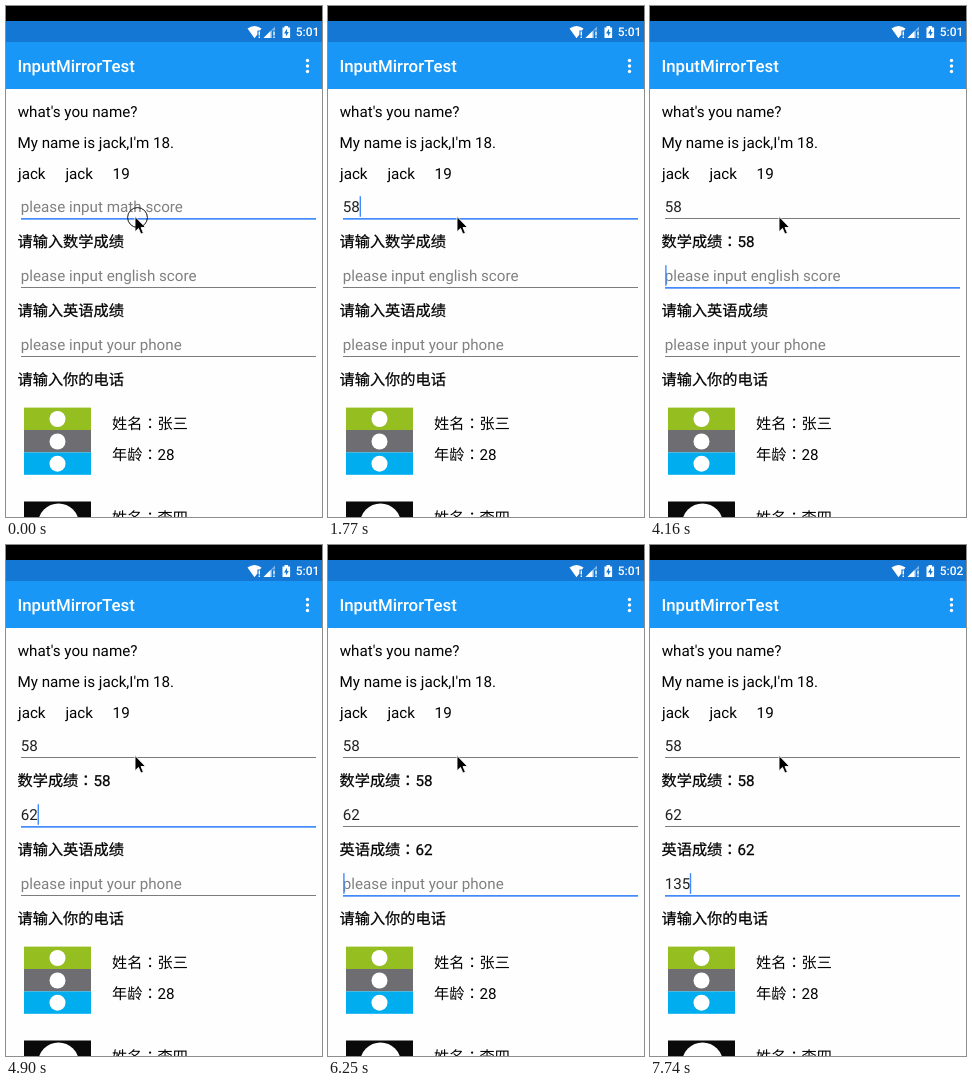
Recreate the animation shown at these times as an HTML page. Size 316 px wide and 511 px high, loop 8000 ms.

```html
<!DOCTYPE html>
<html lang="en">
<head>
<meta charset="utf-8">
<title>Form</title>
<style>
  html, body { margin: 0; width: 100%; height: 100%; overflow: hidden; background: #fefefe; }
  svg { display: block; width: 100vw; height: 100vh; }
  text {
    font: 15.2px Roboto, "Noto Sans CJK SC", "Noto Sans CJK", sans-serif;
    fill: #000; white-space: pre; text-rendering: geometricPrecision;
  }
  .colon { font-family: "Noto Sans CJK JP", "Noto Sans CJK", sans-serif; }
  .label { stroke: #000; stroke-width: .25px; }
  .title { font-size: 16.85px; font-weight: 500; fill: #fff; }
  .clock { font-size: 12px; font-weight: 500; fill: #fff; }
</style>
</head>
<body>
<svg id="stage" viewBox="0 0 316 511" xmlns="http://www.w3.org/2000/svg">
  <rect width="316" height="511" fill="#fefefe"/>
  <rect width="316" height="15" fill="#000"/>
  <rect y="15" width="316" height="21" fill="#1477d4"/>
  <rect y="36" width="316" height="47" fill="#1897f6"/>

  <g fill="#fff">
    <path d="M241.5 22.6Q248.5 17.4 255.5 22.6L254 24.6H251.4V28.6L248.5 32.2Z"/>
    <path d="M252.6 25.4h1.4v4h-1.4zM252.6 30.4h1.4v1.5h-1.4z"/>
    <path d="M257.5 32L269 20.5V24.5H266V32Z" opacity=".45"/>
    <path d="M257.5 32L264.5 25V32Z"/>
    <path d="M267.3 25.4h1.4v4h-1.4zM267.3 30.4h1.4v1.5h-1.4z"/>
    <path d="M276.5 21.5h2V20h3.6v1.5h2V32h-7.6z"/>
    <path d="M281 22.8L278 27.4h1.9v3.2L282.8 26h-1.8z" fill="#1477d4"/>
    <circle cx="301.5" cy="54.5" r="1.7"/>
    <circle cx="301.5" cy="60" r="1.7"/>
    <circle cx="301.5" cy="65.5" r="1.7"/>
  </g>
  <text class="clock" id="clock" x="289.8" y="30.4"></text>
  <text class="title" x="11.4" y="66">InputMirrorTest</text>

  <text x="11.7" y="111.3">what's you name?</text>
  <text x="11.5" y="142">My name is jack,I'm 18.</text>
  <text x="12" y="172.6">jack</text>
  <text x="59.4" y="172.6">jack</text>
  <text x="106.6" y="172.6">19</text>

  <g id="form"></g>

  <rect x="18" y="401.6" width="67" height="22.4" fill="#95bf20"/>
  <rect x="18" y="424" width="67" height="22.4" fill="#6e6e72"/>
  <rect x="18" y="446.4" width="67" height="22.4" fill="#00aeef"/>
  <g fill="#fff">
    <circle cx="51.5" cy="413" r="8"/>
    <circle cx="51.5" cy="435.5" r="8"/>
    <circle cx="51.5" cy="457.7" r="8"/>
  </g>
  <text x="106" y="423.2">姓名<tspan class="colon" lang="ja">：</tspan>张三</text>
  <text x="106" y="454">年龄<tspan class="colon" lang="ja">：</tspan>28</text>

  <rect x="18" y="495.5" width="67" height="15.5" fill="#0a0a0a"/>
  <circle cx="52.5" cy="518" r="20.5" fill="#fff"/>
  <text x="106" y="517.2">姓名<tspan class="colon" lang="ja">：</tspan>李四</text>

  <path d="M129 210.5v15.2l3.5-3.3 2.4 5.7 2.5-1.1-2.4-5.5h4.6z" fill="#000" stroke="#fff" stroke-width=".9"/>
  <circle id="tap" cx="131.5" cy="211.5" r="9.9" fill="none" stroke="#111"/>
</svg>
<script>
const LOOP = 8000;
const NS = "http://www.w3.org/2000/svg";
const BLUE = "#448aff";
const get = id => document.getElementById(id);

function add(tag, attrs) {
  const el = document.createElementNS(NS, tag);
  for (const key in attrs) el.setAttribute(key, attrs[key]);
  return get("form").appendChild(el);
}

// savedAt: when the label below starts to echo the value
const fields = [
  { hint: "please input math score", prompt: "请输入数学成绩", name: "数学成绩", savedAt: 2070, line: 212 },
  { hint: "please input english score", prompt: "请输入英语成绩", name: "英语成绩", savedAt: 5500, line: 281 },
  { hint: "please input your phone", prompt: "请输入你的电话", savedAt: Infinity, line: 350 }
];
for (const f of fields) {
  f.text = add("text", { x: 14.8, y: f.line - 5.8 });
  f.rule = add("rect", { x: 15, y: f.line, width: 295 });
  f.label = add("text", { x: 11.5, y: f.line + 29, class: "label" });
}
const caret = add("rect", { width: 1.4, height: 20.6, fill: BLUE });

// [start, focused field, its value, caret visible]
const steps = [
  [0, 0, "", 0], [440, 0, "", 1], [890, 0, "", 0], [1480, 0, "", 1],
  [1630, 0, "5", 1], [1770, 0, "58", 1], [2210, 0, "58", 0], [2810, 0, "58", 1],
  [3260, 1, "", 1], [3710, 1, "", 0], [4160, 1, "", 1],
  [4310, 1, "6", 1], [4760, 1, "6", 0], [4900, 1, "62", 1], [5500, 1, "62", 0], [5950, 1, "62", 1],
  [6250, 2, "", 1], [6700, 2, "", 0],
  [7140, 2, "1", 1], [7440, 2, "13", 1], [7740, 2, "135", 1]
];

function setLabel(f, value, t) {
  const content = t < f.savedAt
    ? f.prompt
    : `${f.name}<tspan class="colon" lang="ja">：</tspan>${value}`;
  if (f.shown !== content) f.label.innerHTML = f.shown = content;
}

function draw(t) {
  const past = steps.filter(s => s[0] <= t);
  const [, focus, typed, blink] = past[past.length - 1];

  fields.forEach((f, i) => {
    const last = past.filter(s => s[1] === i).pop();
    const value = last ? last[2] : "";
    const active = i === focus;
    f.text.textContent = value || f.hint;
    f.text.style.fill = value ? "#202020" : "#808080";
    f.rule.setAttribute("height", active ? 1.7 : 1);
    f.rule.setAttribute("fill", active ? BLUE : "#7c7c7c");
    setLabel(f, value, t);
  });

  caret.setAttribute("x", 15.2 + 8.2 * typed.length);
  caret.setAttribute("y", fields[focus].line - 21.8);
  caret.setAttribute("opacity", blink);
  get("tap").setAttribute("opacity", t < 150 ? 1 : 0);
  get("clock").textContent = t < 7740 ? "5:01" : "5:02";
}

const start = performance.now();
function tick() {
  draw((performance.now() - start) % LOOP);
  requestAnimationFrame(tick);
}
tick();
</script>
</body>
</html>
```
